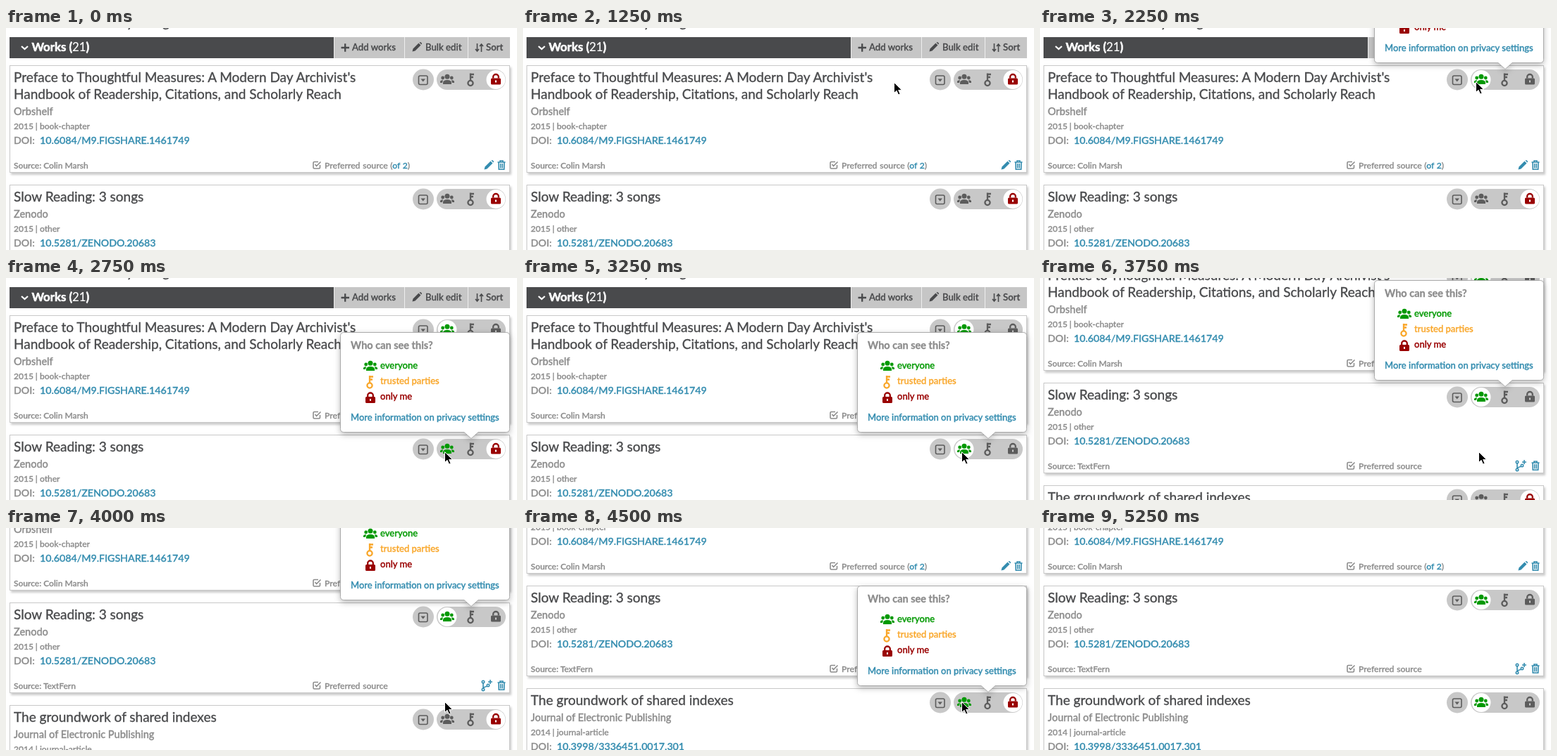
An HTML page for the animation above (6250 ms loop, 725 px wide and 316 px high).

```html
<!DOCTYPE html>
<html lang="en">
<head>
<meta charset="utf-8">
<title>Work privacy settings</title>
<style>
html, body { margin: 0; width: 100%; height: 100%; overflow: hidden; background: #fff; }
svg { display: block; width: 725px; height: 316px; font: 500 12px Lato, sans-serif; fill: currentColor; color: #8c8c8c; }
text { stroke: currentColor; stroke-width: .35px; }
.line { fill: none; stroke: currentColor; stroke-width: 1.6; }
.thick { stroke-width: 2.3; }
.dark { color: #494a4c; }
.icon { color: #5c5c5c; }
.link { color: #338caf; }
.green { color: #090; }
.amber { color: #f9a72b; }
.red { color: #900; }
.white { color: #fff; }
.grey { fill: #c8c8c8; }
.button { font-size: 13.2px; }
.heading { font-size: 16.8px; font-weight: 700; stroke-width: .6px; }
.title { font-size: 19px; font-weight: 400; }
.journal { font-size: 14.5px; }
.doi { font-size: 14.2px; }
.note { font-size: 12.2px; word-spacing: .6px; }
.card { fill: #fff; stroke: #c8c8c8; filter: drop-shadow(2px 3px 1.5px #0003); }
.bubble { fill: #fff; stroke: #aaa; filter: drop-shadow(0 3px 4px #0004); }
.pop { font-size: 13px; }
.question { font-size: 14.5px; font-weight: 700; }
</style>
</head>
<body>
<svg viewBox="0 0 725 316">
  <defs>
    <g id="people">
      <circle cy="-3.8" r="3.5"/><path d="M-6 7V4.5Q-5.5 1 0 1T6 4.5V7Z"/>
      <circle cx="-6.3" cy="-2" r="2.4"/><circle cx="6.3" cy="-2" r="2.4"/>
      <path d="M-10 5V3Q-9.5 1-6 1.2L-7 5ZM10 5V3Q9.5 1 6 1.2L7 5Z"/>
    </g>
    <g id="key" class="line thick"><circle cx="-1" cy="5" r="3.6"/><path d="M-1 1.5V-9M-1-7.5H4M-1-3.5H3"/></g>
    <g id="lock">
      <path fill-rule="evenodd" d="M-5.5-2H5.5Q7-2 7-.5V5.5Q7 7 5.5 7H-5.5Q-7 7-7 5.5V-.5Q-7-2-5.5-2ZM-1 1V4H1V1Z"/>
      <path class="line thick" d="M-3.8-2V-4a3.8 3.5 0 0 1 7.6 0V-2"/>
    </g>
    <path id="pencil" d="M-6.5 6.5L-5.5 2.5 2.5-5.5 5.5-2.5-2.5 5.5ZM3.5-6.5L5-7Q7.5-6 7-4.5L6.3-3.5Z"/>
    <path id="trash" class="line" d="M-5.5-4H5.5M-2-4V-6H2V-4M-4-4L-3.7 6.3H3.7L4-4M-1.3-2V4.5M1.3-2V4.5"/>
    <g id="branch" class="line">
      <circle cx="-5" cy="-5" r="1.7"/><circle cx="-5" cy="6" r="1.7"/><circle cx="2" cy="0" r="1.7"/>
      <path d="M-5-3.3V4.3Q-4.5 2.5 1 1.3M2-5H8M5-8V-2"/>
    </g>
    <path id="check" class="line" d="M4.5 0V3.5Q4.5 5 3 5H-3.5Q-5 5-5 3.5V-3Q-5-4.5-3.5-4.5H2M-2.5-1L-.5 1.5 5.5-4.5"/>
    <g id="menu"><rect class="line" x="-6" y="-6" width="12.5" height="12.5" rx="2"/><path d="M-3-1.5H3.5L.2 2.5Z"/></g>
  </defs>
  <g id="page"></g>
  <path id="cursor" fill="#000" stroke="#fff" d="M0 0V15L3.6 11.8 6 17.5 8.6 16.4 6.2 10.9H11Z"/>
</svg>
<script>
const LOOP = 6250;
const works = [
  { top: 53, open: 1500, pick: 2250, close: 2500,
    title: ["Preface to Thoughtful Measures: A Modern Day Archivist's", "Handbook of Readership, Citations, and Scholarly Reach"],
    journal: "Orbshelf", date: "2015 | book-chapter", doi: "10.6084/M9.FIGSHARE.1461749",
    source: "Colin Marsh", edit: "pencil", count: "of 2" },
  { top: 223, open: 2750, pick: 3250, close: 4500,
    title: ["Slow Reading: 3 songs"],
    journal: "Zenodo", date: "2015 | other", doi: "10.5281/ZENODO.20683", source: "TextFern", edit: "branch" },
  { top: 369, open: 4500, pick: 4750, close: 5250,
    title: ["The groundwork of shared indexes"],
    journal: "Journal of Electronic Publishing", date: "2014 | journal-article", doi: "10.3998/3336451.0017.301",
    source: "TextFern", edit: "branch" }
];
// Rows start with the time from which they hold.
const scrolls = [[0, 0], [3500, 32], [3750, 74], [4000, 117], [4250, 141]];
const pointer = [[0, -50, -50], [750, 503, 73], [1000, 506, 78], [1250, 526, 78], [1500, 609, 81],
  [1750, 618, 77], [2500, 622, 181], [2750, 622, 248], [5000, 594, 176], [5250, -50, -50]];

const text = (x, y, str, cls = "") => `<text x="${x}" y="${y}" class="${cls}">${str}</text>`;
const icon = (id, x, y, cls = "") => `<use href="#${id}" x="${x}" y="${y}" class="${cls}"/>`;

const header = () => `<g class="dark button">
  ${text(171, -1, "y", "title")}${text(222, -1, "g", "title")}
  <rect x="5" y="13" width="460" height="30"/>
  <rect x="465" y="13" width="250" height="30" fill="#c6c6c6"/>
  <path d="M465.5 13V43M565.5 13V43M655.5 13V43" stroke="#eee"/>
  <path class="line thick white" d="M22 26l4.5 4 4.5-4"/>
  ${text(36.5, 33, 'Works (<tspan font-weight="400" stroke-width=".2">21</tspan>)', "heading white")}
  <path class="line thick" d="M475.5 28H487M481.2 22.3V33.7"/>
  ${text(491, 32, "Add works")}${icon("pencil", 583, 27)}${text(595, 32, "Bulk edit")}
  <path class="line" d="M668.5 22V33M666 30l2.5 3 2.5-3M674.5 34V23M672 26l2.5-3 2.5 3"/>
  ${text(681, 32, "Sort")}</g>`;

function card(work) {
  const base = work.top + 24 * work.title.length;
  const mid = work.top + 20.5, foot = base + 99;
  const count = work.count ? ` (<tspan class="link">${work.count}</tspan>)` : "";
  return `<rect class="card" x="5.5" y="${work.top + .5}" width="709" height="${foot + 5 - work.top}"/>
  ${work.title.map((row, i) => text(11, work.top + 24 * (i + 1), row, "title dark")).join("")}
  ${text(11, base + 23, work.journal, "journal")}${text(11, base + 43, work.date)}
  ${text(11, base + 64, "DOI:", "doi")}${text(48, base + 64, work.doi, "doi link")}
  ${text(11, foot, "Source: " + work.source)}${icon("check", 441, foot - 5)}
  ${text(452, foot, "Preferred source" + count, "note")}
  ${icon(work.edit, work.edit == "pencil" ? 685 : 682, foot - 5, "link")}${icon("trash", 703, foot - 5, "link")}
  <circle class="grey" cx="592" cy="${mid}" r="15"/>${icon("menu", 591.5, mid + .5, "icon")}
  <rect class="grey" x="611" y="${mid - 14.5}" width="98" height="29" rx="14.5"/>
  <circle class="knob" cy="${mid}" r="13.5" fill="#fff"/>
  ${icon("people", 626, mid - .5, "everyone")}${icon("key", 660, mid, "icon")}${icon("lock", 695, mid, "private")}`;
}

const popover = () => `<g id="popover" class="pop">
  <path class="bubble" d="M479.5.5H709.5Q714.5.5 714.5 5.5V137.5Q714.5 142.5 709.5 142.5H670L660 151.5 650 142.5H479.5Q474.5 142.5 474.5 137.5V5.5Q474.5.5 479.5.5Z"/>
  ${text(489, 24, "Who can see this?", "question")}
  ${icon("people", 517, 48, "green")}${text(531, 52, "everyone", "green")}
  ${icon("key", 517, 71, "amber")}${text(531, 74, "trusted parties", "amber")}
  ${icon("lock", 517, 94, "red")}${text(531, 96, "only me", "red")}
  ${text(489, 126, "More information on privacy settings", "link")}</g>`;

const page = document.getElementById("page");
page.innerHTML = header() + works.map(work => `<g class="work">${card(work)}</g>`).join("") + popover();
const cards = [...page.querySelectorAll(".work")];
const bubble = document.getElementById("popover");
const cursor = document.getElementById("cursor");
const at = (rows, t) => rows.findLast(row => row[0] <= t);
const move = (el, x, y) => el.setAttribute("transform", `translate(${x} ${y})`);

function draw() {
  const t = performance.now() % LOOP;
  const [, x, y] = at(pointer, t);
  move(page, 0, -at(scrolls, t)[1]);
  move(cursor, x + .5, y - .5);
  works.forEach((work, i) => {
    const picked = t >= work.pick;
    const part = name => cards[i].querySelector(name);
    part(".knob").setAttribute("cx", picked ? 626 : 695);
    part(".everyone").style.color = t >= work.open ? "#090" : "#5c5c5c";
    part(".private").style.color = picked ? "#5c5c5c" : "#900";
  });
  const open = works.find(work => t >= work.open && t < work.close);
  bubble.style.display = open ? "" : "none";
  if (open) move(bubble, 0, open.top - 146);
  requestAnimationFrame(draw);
}
draw();
</script>
</body>
</html>
```
